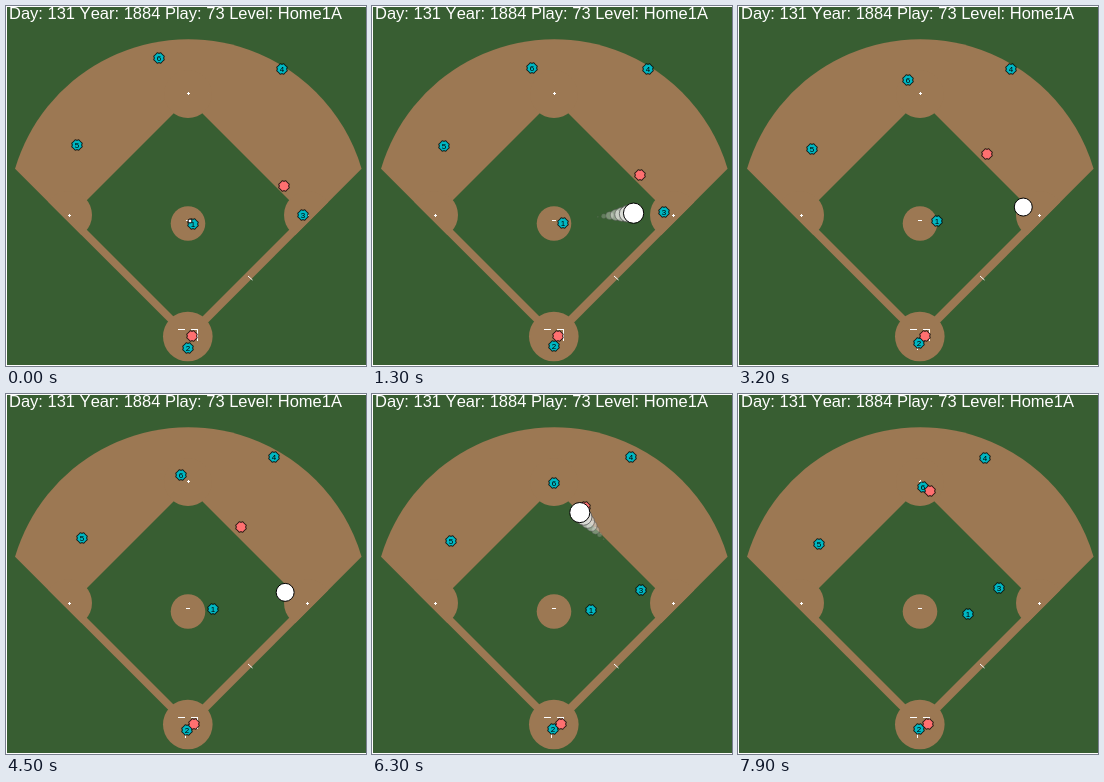
An HTML page with a canvas that plays this animation: 360x360 px, repeating every 8 s.

```html
<!DOCTYPE html>
<html lang="en">
<head>
<meta charset="utf-8">
<title>Infield play</title>
<style>
html, body { margin: 0; width: 100%; height: 100%; overflow: hidden; background: #385e32; }
canvas { display: block; width: 360px; height: 360px; }
</style>
</head>
<body>
<canvas id="stage" width="360" height="360"></canvas>
<script>
const ctx = document.getElementById('stage').getContext('2d');
const LOOP = 8000, STEP = 100, LAST = LOOP - STEP;
const GRASS = '#385e32', DIRT = '#9c7853', TEAL = '#00b7c2', PINK = '#ff7070';
const CATCH = 1800, RELEASE = 4500, ARRIVE = 6900;

const speedUp = p => s => s ** p;
const slowDown = p => s => 1 - (1 - s) ** p;
const mix = (a, b, k) => a + (b - a) * k;

// bend lifts the middle of the path off the straight line
const fielders = [
  { from: [187, 218], to: [230, 220], ease: speedUp(1.37), bend: -4 },
  { from: [182, 342], to: [181, 335], ease: slowDown(2), bend: 0 },
  { from: [297, 209], to: [261, 194], ease: speedUp(1.15), bend: -1.8 },
  { from: [276.4, 62.6], to: [247, 64], ease: speedUp(2.3), bend: 0 },
  { from: [71, 139], to: [81, 150], ease: speedUp(1.25), bend: 0 },
  { from: [153, 52], to: [185, 93], ease: slowDown(1.4), bend: 1 }
];
const runners = [
  { from: [278, 180], to: [192, 97], ease: speedUp(1.22), bend: -5.5 },
  { from: [186, 330], to: [190, 330], ease: speedUp(1.2), bend: 0 }
];

function position({ from, to, ease, bend }, t) {
  const u = ease(t / LAST);
  return [mix(from[0], to[0], u), mix(from[1], to[1], u) + bend * 4 * u * (1 - u)];
}

function flight(from, to, u) {
  return [mix(from[0], to[0], u), mix(from[1], to[1], u), 9 + 1.5 * Math.sin(Math.PI * u)];
}

function heldBall(t) {
  const [x, y] = position(fielders[2], t);
  return [x + 1, y - 1, 9];
}

function ballAt(time) {
  const t = Math.max(0, time);
  if (t < CATCH) {
    const [x, y, r] = flight([184, 215], heldBall(CATCH), t / CATCH);
    return [x, y, Math.min(r, 2 + t / 40)];
  }
  if (t < RELEASE) return heldBall(t);
  return flight(heldBall(RELEASE), [184, 92], (t - RELEASE) / (ARRIVE - RELEASE));
}

function paint(fill, stroke) {
  ctx.fillStyle = fill;
  ctx.fill();
  if (!stroke) return;
  ctx.strokeStyle = stroke;
  ctx.lineWidth = 1;
  ctx.stroke();
}

function disc(x, y, r, fill, stroke) {
  ctx.beginPath();
  ctx.arc(x, y, r, 0, Math.PI * 2);
  paint(fill, stroke);
}

// Circle with eight small lobes
function token(x, y, fill) {
  ctx.beginPath();
  for (let i = 0; i < 48; i++) {
    const a = i * Math.PI / 24, r = 5.1 + 0.4 * Math.cos(8 * a + Math.PI);
    ctx.lineTo(x + r * Math.cos(a), y + r * Math.sin(a));
  }
  ctx.closePath();
  paint(fill, '#000');
}

function line(x1, y1, x2, y2) {
  ctx.beginPath();
  ctx.moveTo(x1, y1);
  ctx.lineTo(x2, y2);
  ctx.stroke();
}

function base(x, y) {
  ctx.fillRect(x - 1, y, 3, 1);
  ctx.fillRect(x, y - 1, 1, 3);
}

function drawField() {
  ctx.fillStyle = GRASS;
  ctx.fillRect(0, 0, 360, 360);

  ctx.save();
  ctx.beginPath();
  const edge = Math.asin(51.3 / 180.7);
  ctx.moveTo(182.5, 336);
  ctx.arc(182.3, 214, 180.7, Math.PI + edge, 2 * Math.PI - edge);
  ctx.closePath();
  ctx.clip();
  ctx.fillStyle = DIRT;
  ctx.fillRect(0, 0, 360, 360);
  ctx.fillStyle = GRASS;
  ctx.beginPath();
  ctx.moveTo(182, 93);
  ctx.lineTo(298, 209);
  ctx.lineTo(182, 325);
  ctx.lineTo(66, 209);
  ctx.fill();
  for (const [x, y] of [[182, 88], [62, 209], [302, 209]]) disc(x, y, 24, DIRT);
  ctx.restore();

  disc(182, 217.5, 17.3, DIRT);
  disc(181.8, 330.5, 24.8, DIRT);

  ctx.fillStyle = ctx.strokeStyle = '#fff';
  ctx.lineWidth = 1;
  base(63, 209);
  base(301, 209);
  base(182, 87);
  line(180, 214.5, 184, 214.5);
  line(242, 270, 246.5, 274);
  line(172, 323.5, 179, 323.5);
  line(185, 323.5, 192, 323.5);
  line(191.5, 323, 191.5, 335);
  line(179.5, 338, 179.5, 344);
}

function drawPlayer(player, t, fill, label = '') {
  const [x, y] = position(player, t).map(Math.round);
  token(x, y, fill);
  ctx.fillStyle = '#000';
  ctx.font = '8px "Liberation Sans", Arial, sans-serif';
  ctx.textAlign = 'center';
  ctx.fillText(label, x, y + 3);
}

function drawBall(t) {
  if (t > ARRIVE) return;
  for (let i = 6; i > 0; i--) {
    const [x, y, r] = ballAt(t - i * STEP);
    ctx.globalAlpha = 0.95 - i * 0.14;
    disc(x, y, r * (0.95 - i * 0.145), '#e4e4e0', '#555');
  }
  ctx.globalAlpha = 1;
  disc(...ballAt(t), '#fff', '#000');
}

function draw(t) {
  drawField();
  fielders.forEach((p, i) => drawPlayer(p, t, TEAL, String(i + 1)));
  runners.forEach(p => drawPlayer(p, t, PINK));
  drawBall(t);
  ctx.fillStyle = '#fff';
  ctx.font = '16.5px "Liberation Sans", Arial, sans-serif';
  ctx.fontKerning = 'none';
  ctx.textAlign = 'left';
  ctx.fillText('Day: 131 Year: 1884 Play: 73 Level: Home1A', 3, 13);
  ctx.fillRect(0, 0, 360, 1);
  ctx.fillRect(0, 0, 1, 360);
  ctx.fillRect(0, 359, 360, 1);
}

const start = performance.now();
function tick() {
  const t = (performance.now() - start) % LOOP;
  draw(Math.floor(t / STEP) * STEP);
  requestAnimationFrame(tick);
}
tick();
</script>
</body>
</html>
```
